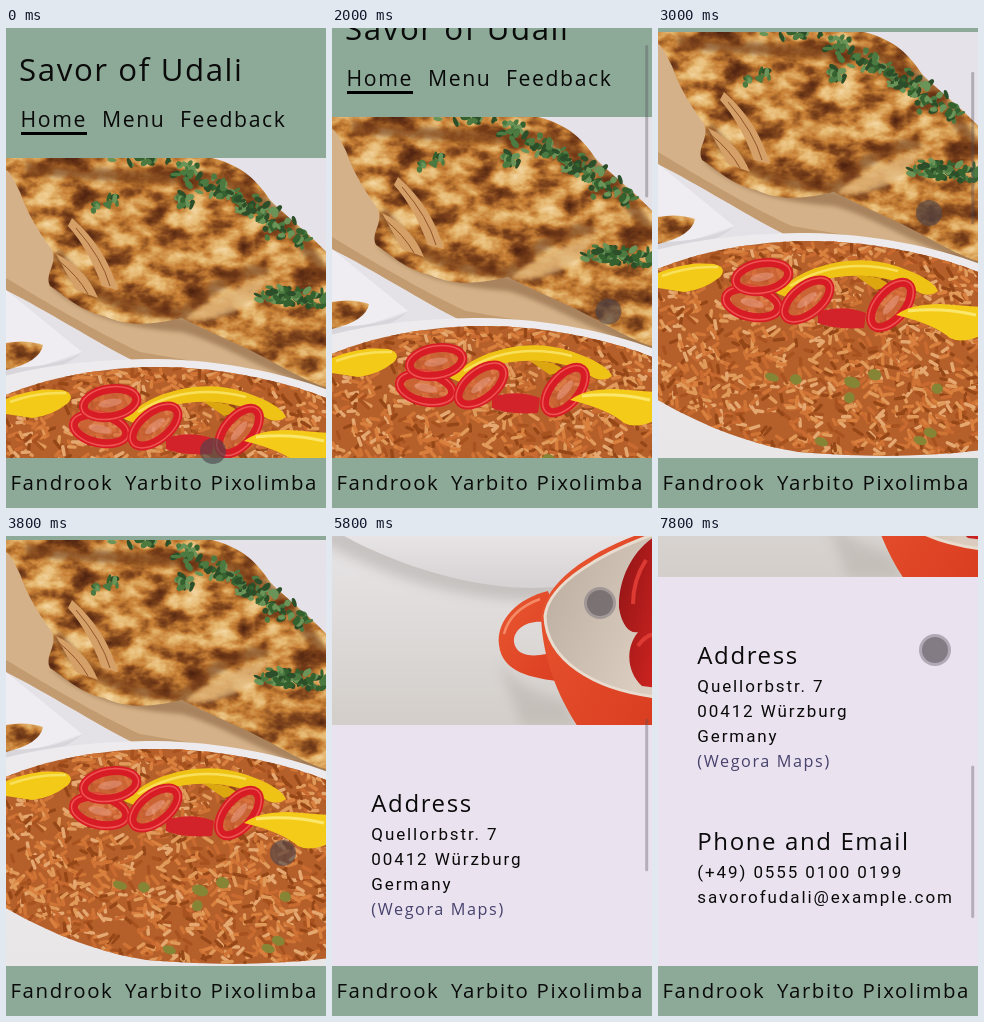
These frames come from a looping animation (320 by 480 pixels, 8000 ms). An HTML page:

```html
<!DOCTYPE html>
<html lang="en">
<head>
<meta charset="utf-8">
<title>Savor of Udali</title>
<style>
html, body { margin: 0; width: 100%; height: 100%; overflow: hidden; background: #ebe2f0; }
svg { display: block; width: 100%; height: 100%; }
text { font-family: "Open Sans", sans-serif; letter-spacing: 1.6px; fill: #0a0a0a; white-space: pre; }
.title { font-size: 31.2px; }
.nav { font-size: 21.2px; }
.social { font-size: 20.4px; }
.head { font-size: 24px; }
.body { font-family: Roboto, sans-serif; font-size: 17px; letter-spacing: 1.9px; }
.link { font-size: 16.2px; fill: #46426c; }
</style>
</head>
<body>
<svg viewBox="0 0 320 480">
  <defs>
    <linearGradient id="table" x1="0" y1="0" x2="0" y2="1">
      <stop offset="0" stop-color="#e5e2ea"/><stop offset=".75" stop-color="#e4e1e2"/><stop offset="1" stop-color="#d3cec9"/>
    </linearGradient>
    <linearGradient id="bowl" x1="0" y1="0" x2="0" y2="1">
      <stop offset="0" stop-color="#eeebee"/><stop offset=".8" stop-color="#e9e6e8"/><stop offset="1" stop-color="#d6d1d2"/>
    </linearGradient>
    <linearGradient id="pot" x1="0" y1="0" x2="1" y2="1">
      <stop offset="0" stop-color="#ea5731"/><stop offset="1" stop-color="#d93d20"/>
    </linearGradient>
    <linearGradient id="inside" x1="0" y1="0" x2="1" y2=".6">
      <stop offset="0" stop-color="#b9ab9e"/><stop offset="1" stop-color="#dacdc0"/>
    </linearGradient>
    <linearGradient id="tomato" x1="0" y1="0" x2="1" y2="1">
      <stop offset="0" stop-color="#8f1416"/><stop offset="1" stop-color="#cf2420"/>
    </linearGradient>
    <filter id="soft"><feGaussianBlur stdDeviation="2"/></filter>
    <filter id="shade"><feGaussianBlur stdDeviation="6"/></filter>
    <filter id="roast" x="0" y="0" width="1" height="1" color-interpolation-filters="sRGB">
      <feTurbulence type="fractalNoise" baseFrequency=".035 .05" numOctaves="4" seed="11"/>
      <feColorMatrix values="1 0 0 0 0  1 0 0 0 0  1 0 0 0 0  0 0 0 0 1"/>
      <feComponentTransfer>
        <feFuncR type="table" tableValues=".25 .33 .5 .78 .9 .95 1"/>
        <feFuncG type="table" tableValues=".1 .15 .27 .5 .72 .83 .9"/>
        <feFuncB type="table" tableValues=".04 .07 .11 .21 .44 .62 .7"/>
      </feComponentTransfer>
      <feComposite in2="SourceAlpha" operator="in"/>
    </filter>
    <clipPath id="photoClip"><path d="M0 130H320V755H0Z"/></clipPath>
    <clipPath id="fishClip"><path id="fishShape" d="M0 130H206C238 138 252 154 264 172C284 192 302 204 322 226V360C296 352 276 338 244 322C222 312 200 302 176 290C150 296 124 300 98 288C72 282 60 268 44 258C38 246 52 236 46 222C30 200 20 182 14 164C8 152 4 144 0 142Z"/></clipPath>
    <clipPath id="riceClip"><path id="riceShape" d="M-5 369C40 349 100 338 160 339C230 341 290 357 325 372V548C260 556 200 555 140 550C80 540 30 516 -5 495Z"/></clipPath>
  </defs>

  <g id="page">
    <rect width="320" height="131" fill="#8daa98"/>
    <text class="title" x="13" y="53">Savor of Udali</text>
    <text class="nav" x="14.5" y="98.5">Home</text>
    <text class="nav" x="96" y="98.5">Menu</text>
    <text class="nav" x="174" y="98.5">Feedback</text>
    <rect x="15" y="104" width="66" height="3"/>

    <g clip-path="url(#photoClip)">
      <rect y="130" width="320" height="625" fill="url(#table)"/>
      <path d="M0 130H150L322 250V367C250 352 180 342 130 334C90 314 40 282 0 262Z" fill="#d4b188"/>
      <path d="M0 250C40 274 90 304 134 324C190 334 260 344 322 356V367C250 352 180 342 130 334C90 314 40 282 0 262Z" fill="#c39b70"/>
      <path d="M44 258C70 282 110 300 176 304C220 316 260 346 322 364V352L180 290Z" fill="#7d5735" opacity=".5" filter="url(#soft)"/>

      <use href="#fishShape" filter="url(#roast)"/>
      <g clip-path="url(#fishClip)">
        <g fill="none" stroke="#6b3413" stroke-width="12" opacity=".6" filter="url(#soft)">
          <path d="M20 140Q120 150 190 150T320 250M50 225Q90 285 180 285M172 296Q200 250 262 240"/>
        </g>
        <path d="M178 292Q206 266 262 250Q236 296 178 292Z" fill="#dfb57a" opacity=".8" filter="url(#soft)"/>
        <path d="M66 190Q100 220 112 262L96 258Q82 220 62 198ZM50 226Q80 240 92 270L70 262Z" fill="#d4a068"/>
        <path d="M70 200Q96 230 104 258M52 232Q72 248 82 266" stroke="#8f552a" fill="none"/>
      </g>
      <g id="herbs"></g>

      <path d="M0 262L76 324L0 350Z" fill="#efedf2"/>
      <path d="M0 340Q44 340 76 325Q50 346 0 352Z" fill="#d8d5db"/>
      <path d="M0 315Q20 311 37 317Q34 334 0 342Z" filter="url(#roast)"/>

      <path d="M-10 572C60 612 140 632 210 630C270 626 300 610 330 590V560H-10Z" fill="#9d9690" opacity=".4" filter="url(#shade)"/>
      <path d="M-5 349C40 336 100 331 150 331C220 332 280 346 325 363V582C300 602 260 618 200 618C140 618 60 596 -5 556Z" fill="url(#bowl)"/>
      <use href="#riceShape" fill="#b5602b"/>
      <g id="rice" clip-path="url(#riceClip)" fill="none" stroke-width="3.4" stroke-linecap="round"></g>

      <path d="M0 371Q28 359 56 362Q70 366 62 375Q46 388 26 390L0 386Z" fill="#f3ca18"/>
      <path d="M118 391C146 362 198 350 238 364C262 372 276 380 280 389Q272 395 262 391C240 376 210 371 180 375C152 379 142 389 128 395Z" fill="#efc216"/>
      <path d="M132 384Q180 354 240 369M4 374Q30 364 60 365" fill="none" stroke="#f9e05a" stroke-width="2.5"/>
      <path d="M198 374Q222 372 232 384L218 388Z" fill="#dba60f"/>
      <path d="M160 410Q186 402 208 411L206 426Q176 428 160 421Z" fill="#d3232a"/>
      <g id="rings"></g>
      <path d="M238 413Q252 402 282 402L322 405V434Q304 442 292 436Q276 422 238 413Z" fill="#f4cb19"/>
      <path d="M250 409Q284 405 318 413" fill="none" stroke="#fbe76c" stroke-width="3"/>

      <path d="M165 690Q190 722 232 730L246 756H190Z" fill="#a29a94" opacity=".3" filter="url(#shade)"/>
      <path fill-rule="evenodd" d="M216 621C186 628 164 650 167 675C170 702 198 708 232 712L226 650ZM212 652C194 650 181 660 182 672C184 686 200 687 214 684Z" fill="url(#pot)"/>
      <path d="M172 664Q178 640 208 629" fill="none" stroke="#f58a66" stroke-width="2.5"/>
      <path d="M325 558C268 576 216 606 209 645C210 690 228 730 246 757H325Z" fill="url(#pot)"/>
      <path d="M325 563C272 582 217 612 213 646C214 690 262 720 325 727" fill="url(#inside)" stroke="#e8dccf" stroke-width="3"/>
      <path d="M325 565C300 580 286 610 287 638C290 656 298 664 306 662C292 680 296 704 310 716L325 718Z" fill="url(#tomato)"/>
      <path d="M314 590Q301 610 301 634M306 676Q314 664 325 664" fill="none" stroke="#dc3a33" stroke-width="4"/>
    </g>

    <rect y="755" width="320" height="780" fill="#ebe2f0"/>
    <g id="contact"></g>
  </g>

  <rect id="bar" x="313.2" width="3" height="152.5" rx="1.5" fill="#55505a" opacity=".36"/>
  <rect y="430" width="320" height="50" fill="#8daa98"/>
  <text class="social" x="4.5" y="462">Fandrook</text>
  <text class="social" x="119" y="462">Yarbito</text>
  <text class="social" x="204.5" y="462">Pixolimba</text>
  <g id="cursor">
    <circle id="halo" r="16" fill="#77717c" opacity=".5"/>
    <circle id="dot" r="13" fill="#4b444a"/>
  </g>
</svg>
<script>
const $ = id => document.getElementById(id);
let seed = 7;
const rnd = () => (seed = seed * 16807 % 2147483647) / 2147483647;
const mix = (a, b, f) => a + (b - a) * f;
const between = (a, b) => mix(a, b, rnd());
const pick = list => list[Math.floor(rnd() * list.length)];
const repeat = (n, fn) => Array.from({ length: n }, fn).join('');
const oval = (x, y, rx, ry, turn, rest) =>
  `<ellipse rx="${rx}" ry="${ry}" transform="translate(${x} ${y}) rotate(${turn})" ${rest}/>`;

// Leaves strewn along a line
const leafTones = ['#4c7a40', '#35612f', '#6a9458', '#2c4f2a'];
const strew = (n, x0, y0, x1, y1, spread) => repeat(n, () => {
  const f = rnd();
  return oval(mix(x0, x1, f) + between(-spread, spread), mix(y0, y1, f) + between(-spread, spread) * .8,
    between(2.5, 5.5), between(1.5, 3.2), between(0, 180), `fill="${pick(leafTones)}"`);
});
$('herbs').innerHTML = strew(130, 180, 142, 298, 214, 13) + strew(75, 258, 266, 318, 272, 10) +
  strew(14, 84, 181, 108, 171, 5) + strew(14, 106, 134, 160, 132, 5) + strew(14, 172, 176, 182, 170, 7);

const grainTones = ['#d9803f', '#c96b31', '#e09a5a', '#a85220', '#d07436', '#e4a870', '#964718'];
$('rice').innerHTML = repeat(1500, () => {
  const a = between(-.9, 1.7), len = between(5, 10);
  return `<path d="M${between(-4, 324).toFixed(1)} ${between(336, 556).toFixed(1)}l${
    (Math.cos(a) * len).toFixed(1)} ${(Math.sin(a) * len).toFixed(1)}" stroke="${pick(grainTones)}"/>`;
}) + repeat(9, () => oval(between(90, 315), between(460, 540), between(5, 9), between(4, 6), 20, 'fill="#868536"'));

const ring = (x, y, turn) =>
  oval(x, y, 27, 14, turn, 'fill="#d9683c" fill-opacity=".6" stroke="#d81c25" stroke-width="9"') +
  oval(x, y, 29, 16, turn, 'fill="none" stroke="#ee5552" stroke-width="1.5"') +
  oval(x, y, 12, 4, turn, 'fill="#e8a08a" opacity=".5"');
$('rings').innerHTML = ring(94, 401, 12) + ring(104, 375, -10) + ring(149, 398, -38) + ring(233, 403, -50);

const block = (y, title, ...rows) => `<text class="head" x="39.3" y="${y}">${title}</text>` +
  rows.map((row, i) => `<text class="${row[0] === '(' && row.includes('Maps') ? 'link' : 'body'}" x="39.3" y="${
    y + 27.5 + 25.3 * i}">${row}</text>`).join('');
$('contact').innerHTML =
  block(842, 'Address', 'Quellorbstr. 7', '00412 Würzburg', 'Germany', '(Wegora Maps)') +
  block(1028, 'Phone and Email', '(+49) 0555 0100 0199', 'savorofudali@example.com');

// Each drag: time span, finger from and to, distance scrolled
const drags = [
  { t: [1600, 2830], from: [279, 331], to: [271, 185], by: 126 },
  { t: [3800, 4200], from: [277, 317], to: [270, 130], by: 187 },
  { t: [5000, 5800], from: [266, 320], to: [268, 67], by: 253 },
  { t: [6600, 7800], from: [275, 246], to: [277, 114], by: 148 },
];
// Rest before the finger glides to the next drag
const HOLD = 200, LOOP = 8000, STEP = 200, FADE = 400;
const part = (t, a, b) => Math.min(1, Math.max(0, (t - a) / (b - a)));

function pose(t) {
  let x = 207, y = 423, scroll = 0, free = 0, scrolling = false;
  const glide = (to, f) => { x = mix(x, to[0], f); y = mix(y, to[1], f); };
  for (const d of drags) {
    const [a, b] = d.t, f = part(t, a, b);
    glide(d.from, part(t, free, free ? a : 1000));
    glide(d.to, f);
    scroll += d.by * f;
    scrolling ||= t > a && t < b + FADE;
    if (t < b) break;
    free = b + HOLD;
  }
  return { x, y, scroll, scrolling };
}

function draw(now) {
  const t = Math.floor(now % LOOP / STEP) * STEP;
  const { x, y, scroll, scrolling } = pose(t);
  const late = t >= 5800;
  $('page').setAttribute('transform', `translate(0 ${-Math.round(scroll)})`);
  $('bar').setAttribute('y', 4 + scroll * .316);
  $('bar').setAttribute('visibility', scrolling ? 'visible' : 'hidden');
  $('cursor').setAttribute('transform', `translate(${x} ${y})`);
  $('halo').setAttribute('visibility', late ? 'visible' : 'hidden');
  $('dot').setAttribute('opacity', late ? .45 : .62);
}

const start = performance.now();
function tick() {
  draw(performance.now() - start);
  requestAnimationFrame(tick);
}
tick();
</script>
</body>
</html>
```
